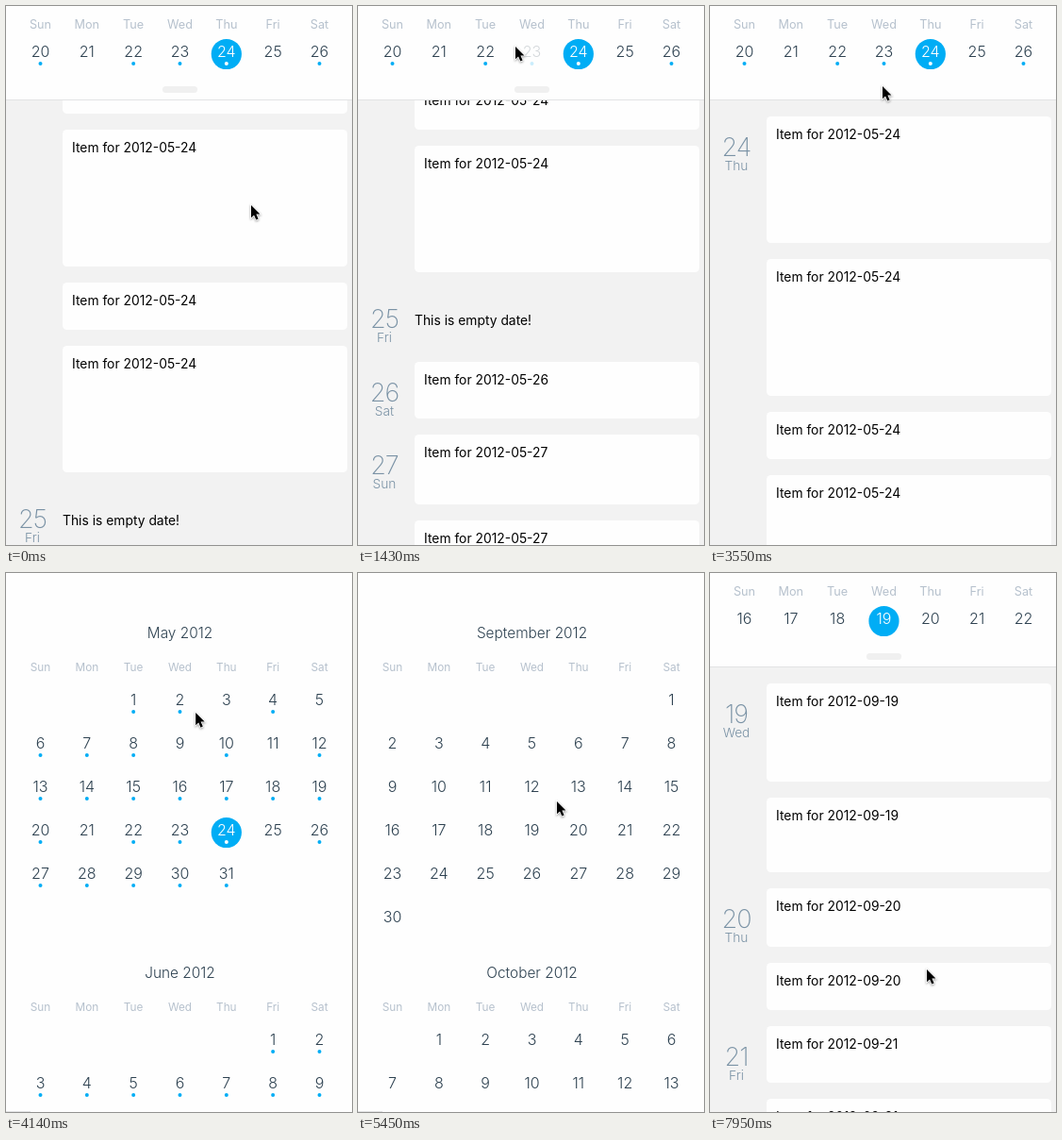
Write an HTML page that moves like this. It is 367 px wide and 571 px high and loops after 8 s.

```html
<!DOCTYPE html>
<html lang="en">
<head>
<meta charset="utf-8">
<title>Agenda calendar</title>
<style>
html, body { margin: 0; width: 100%; height: 100%; overflow: hidden; background: #f2f2f2; }
svg { display: block; width: 367px; height: 571px; font-family: Inter, "Liberation Sans", sans-serif; }
text { font-weight: 300; }
.mid text { text-anchor: middle; }
.white { fill: #fefefe; }
.item { font-size: 13.85px; font-weight: 400; }
.date { fill: #7a92a5; text-anchor: middle; }
.num { font-size: 27px; font-weight: 200; letter-spacing: -1px; }
.name { font-size: 13.7px; }
.title { font-size: 15.4px; fill: #2d4150; }
.week { font-size: 11.8px; font-weight: 400; fill: #b6c1cd; }
#strip .week { font-size: 12.7px; }
.day { font-size: 16px; fill: #2d4150; }
.day .disc { fill: none; }
.day .dot { fill: #00adf5; }
.day.on, .day.on .dot { fill: #fff; }
.day.on .disc { fill: #00adf5; }
.day.press { opacity: .2; }
</style>
</head>
<body>
<svg viewBox="0 0 367 571">
  <clipPath id="clip"><rect id="clipBox" width="367"/></clipPath>
  <g id="may"></g>
  <g id="sep"></g>
  <rect id="panel" class="white" width="367"/>
  <g clip-path="url(#clip)"><g id="months" class="mid"></g></g>
  <g id="strip" class="mid"><rect class="white" width="367" height="31"/></g>
  <g id="foot">
    <rect class="white" y="-24" width="367" height="24"/>
    <rect id="knob" x="166" y="-14" width="37" height="7" rx="3.5" fill="#f0f0f0"/>
  </g>
  <rect id="edge" height="1" fill="#e2e3e4"/>
  <g id="cursor"><path transform="scale(.93)" d="M0 0V14.2L3.3 11.2L5.7 16.8L8.2 15.7L5.8 10.3H10.2Z" stroke="#fff" stroke-width="1.6" paint-order="stroke" style="filter:drop-shadow(0 1px 1px #0006)"/></g>
</svg>
<script>
const LOOP = 8000, CLOSED = 99, OPEN = 570, STAGE = 571;
const MONTH_STEP = 360, ROW_SHIFT = 224, HOME = 117, GAP = 17;
const NAMES = ['Sun', 'Mon', 'Tue', 'Wed', 'Thu', 'Fri', 'Sat'];
const MONTHS = ['May', 'June', 'July', 'August', 'September', 'October'];
const QUIET_MAY = [3, 5, 9, 11, 21, 25];
const LAST_BUSY = new Date(2012, 7, 8);

const $ = id => document.getElementById(id);
const colX = i => 36.5 + 49.33 * i;
const label = (x, y, cls, s) => `<text x="${x}" y="${y}" class="${cls}">${s}</text>`;
const weekdays = y => NAMES.map((n, i) => label(colX(i), y, 'week', n)).join('');

function drawMonth(name, k) {
  const month = k + 5, top = k * MONTH_STEP;
  const first = new Date(2012, month - 1, 1).getDay();
  const count = new Date(2012, month, 0).getDate();
  let out = label(184.5, top + 69, 'title', name + ' 2012') + weekdays(top + 103.8);
  for (let d = 1; d <= count; d++) {
    const cell = first + d - 1;
    const x = colX(cell % 7), y = top + 134.6 + 46 * Math.floor(cell / 7);
    const busy = new Date(2012, month - 1, d) <= LAST_BUSY && !(month === 5 && QUIET_MAY.includes(d));
    out += `<g class="day" id="${month}-${d}"><circle class="disc" cx="${x}" cy="${y + 2.4}" r="16.1"/>` +
      label(x, y + 5.8, '', d) +
      (busy ? `<circle class="dot" cx="${x}" cy="${y + 12.4}" r="2"/>` : '') + '</g>';
  }
  return out;
}

// Days run on from the first; each has a list of card heights, or none.
function drawAgenda(month, firstDay, days) {
  let out = '', y = 0;
  days.forEach((cards, i) => {
    const day = firstDay + i, name = NAMES[new Date(2012, month - 1, day).getDay()];
    out += label(28, y + 41.8, 'date num', day) + label(28, y + 57, 'date name', name);
    if (!cards.length) {
      out += label(60, y + 39, 'item', 'This is empty date!');
      y += 61 + GAP;
    }
    for (const h of cards) {
      out += `<rect class="white" x="60" y="${y}" width="302" height="${h}" rx="4.5"/>` +
        label(70, y + 24, 'item', `Item for 2012-0${month}-${day}`);
      y += h + GAP;
    }
  });
  return out;
}

const move = (id, x, y) => $(id).setAttribute('transform', `translate(${x} ${y})`);
const show = (id, on) => $(id).style.display = on ? '' : 'none';

$('months').innerHTML = MONTHS.map(drawMonth).join('');
$('strip').innerHTML += weekdays(23.7);
$('may').innerHTML = drawAgenda(5, 23, [[64, 73], [134, 145, 50, 134], [], [60], [74, 110]]);
$('sep').innerHTML = drawAgenda(9, 19, [[104, 79], [62, 50], [60, 120]]);
move('sep', 0, HOME);

const smooth = u => u * u * (3 - 2 * u);
const glide = u => 1 - (1 - u) ** 3;
const ramp = (t, start, length, ease = smooth) => ease(Math.min(1, Math.max(0, (t - start) / length)));

// The pointer sets off at most TRAVEL ms before each arrival: [time, x, y].
const TRAVEL = 450;
const STOPS = [
  [0, 260, 211], [590, 241, 290], [1400, 167, 43], [2120, 235, 63], [3080, 182, 113], [3540, 183, 85],
  [4100, 201, 141], [4500, 208, 380], [4900, 211, 242], [6050, 184, 272], [7600, 317, 331], [7950, 230, 420]
];

function pointerAt(t) {
  let [last, x, y] = STOPS[0];
  for (const [time, nx, ny] of STOPS.slice(1)) {
    const length = Math.min(TRAVEL, time - last), u = ramp(t, time - length, length);
    x += (nx - x) * u;
    y += (ny - y) * u;
    last = time;
  }
  return [x, y];
}

const TAPS = [['5-24', -1000], ['5-23', 1540], ['5-24', 2500], ['9-19', 6290]];
const HOLD = 130;

function draw(t) {
  const selected = TAPS.findLast(tap => tap[1] <= t)[0];
  const pressed = TAPS.find(tap => t < tap[1] && t >= tap[1] - HOLD)?.[0];
  for (const [id] of TAPS) {
    $(id).classList.toggle('on', id === selected);
    $(id).classList.toggle('press', id === pressed);
  }

  const list = -191 - 212 * ramp(t, 20, 570, glide) + 520 * ramp(t, 1520, 500) - 171 * ramp(t, 2480, 460);
  move('may', 0, list);
  show('may', t < 6200);
  show('sep', t >= 7220);

  const open = ramp(t, 3690, 410) - ramp(t, 6250, 500);
  const full = open === 1;
  const bottom = CLOSED + (OPEN - CLOSED) * open;
  for (const id of ['panel', 'clipBox']) $(id).setAttribute('height', full ? STAGE : bottom);
  move('months', 0, -4 * MONTH_STEP * ramp(t, 4540, 910, glide) - ROW_SHIFT * (1 - open));
  $('strip').style.opacity = $('foot').style.opacity = Math.max(0, 1 - open * 4.7);
  move('foot', 0, bottom);
  show('knob', t < 3080 || t > 6290);
  move('edge', 0, bottom);
  $('edge').setAttribute('width', full ? 26 : 367);
  move('cursor', ...pointerAt(t));
}

const start = performance.now();
function tick() {
  draw((performance.now() - start) % LOOP);
  requestAnimationFrame(tick);
}
tick();
</script>
</body>
</html>
```
